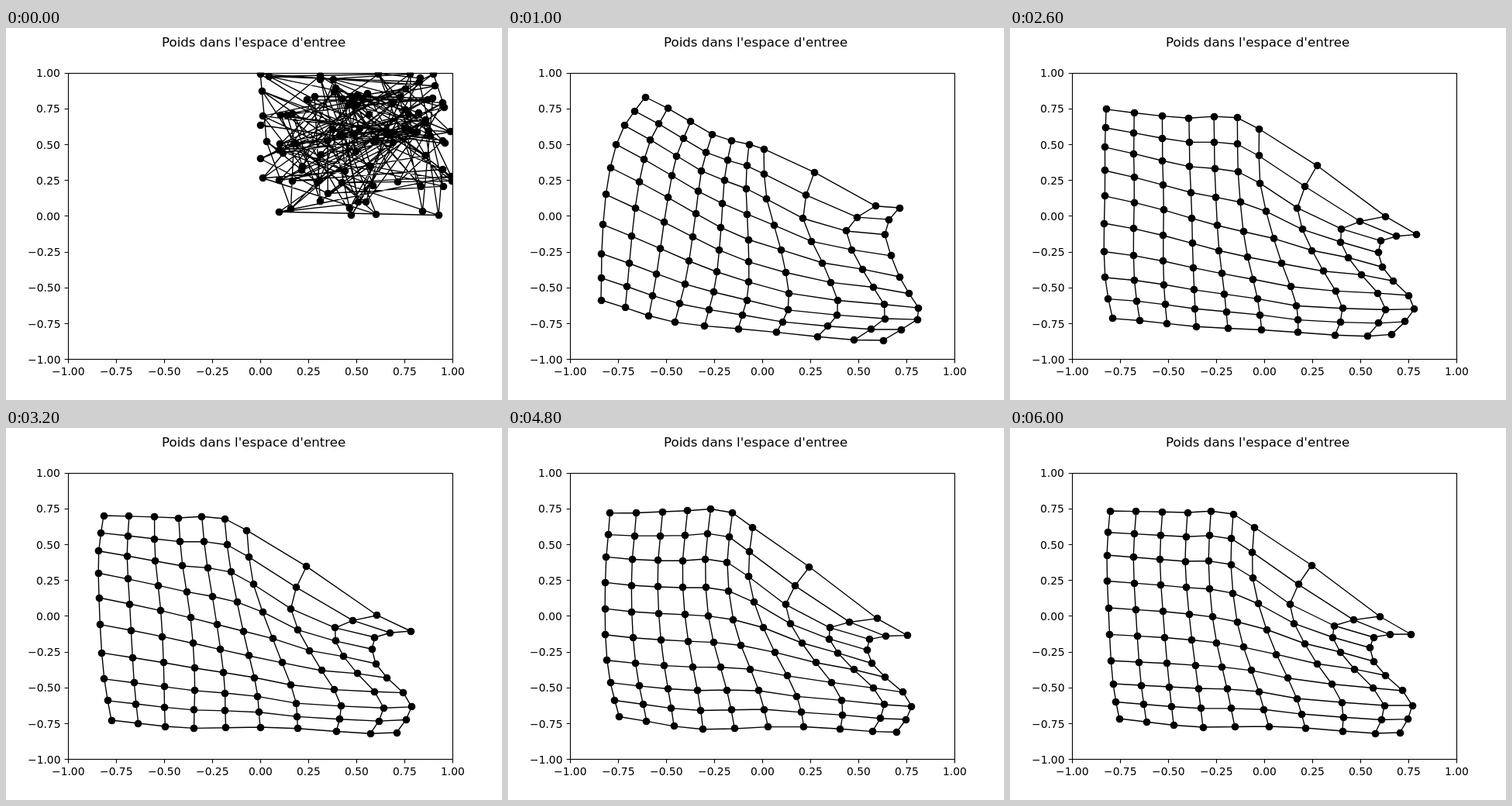
Write an HTML page with a canvas that moves like this. It is 640 px wide and 480 px high and loops after 6.2 s.

```html
<!DOCTYPE html>
<html lang="fr">
<head>
<meta charset="utf-8">
<title>Poids dans l'espace d'entree</title>
<style>
html, body { margin: 0; width: 100%; height: 100%; overflow: hidden; background: #fff; }
canvas { display: block; }
</style>
</head>
<body>
<canvas id="stage" width="640" height="480"></canvas>
<script>
const ctx = document.getElementById('stage').getContext('2d');
const N = 10, STEP = 200, LOOP = 6200;
const LEFT = 80, TOP = 57.6, WIDTH = 496, HEIGHT = 369.6;

// The settled net, as a smooth surface through a few of its nodes.
const rest = {
  cols: [0, 3, 5, 6, 7, 8, 9],
  rows: [0, 2, 4, 7, 9],
  points: [
    129,107, 229,109, 288,111, 315,128, 389,177, 477,243, 517,266,
    125,164, 226,172, 285,176, 313,193, 361,227, 418,255, 469,270,
    127,232, 231,240, 293,250, 331,260, 380,278, 426,289, 469,301,
    133,330, 243,336, 321,340, 370,349, 428,354, 483,358, 519,358,
    141,375, 249,386, 334,385, 381,387, 429,391, 471,394, 503,393]
};

// A bend moves the corners, edge middles and centre of the settled net.
const bend = (...points) => ({ cols: [0, 5, 9], rows: [0, 4, 9], points });
const keys = [
  { step: 5, bend: bend(48,-18, 23,39, -12,-34, 5,-52, 17,23, 36,20, -21,-24, -37,3, -19,10) },
  { step: 9, bend: bend(-6,-10, 14,6, 7,3, -5,-11, 7,9, 22,18, -12,-3, -20,4, -30,11) },
  { step: 16, bend: bend(-3,6, -6,6, 5,-4, -7,-13, 13,12, 8,3, -5,2, -6,1, 1,0) },
  { step: 20 },
  { step: 30 }
];

let seed = 11;
function random() {
  seed = (seed * 16807) % 2147483647;
  return seed / 2147483647;
}

// Cubic curve through the values vs at the knots ks.
function cubic(ks, vs, u) {
  const last = ks.length - 1;
  const chord = i => (vs[i + 1] - vs[i]) / (ks[i + 1] - ks[i]);
  const slope = i => {
    if (i === 0) return chord(0);
    if (i === last) return chord(last - 1);
    const a = ks[i] - ks[i - 1], b = ks[i + 1] - ks[i];
    return (chord(i - 1) * b + chord(i) * a) / (a + b);
  };
  let i = 0;
  while (i < last - 1 && u >= ks[i + 1]) i++;
  const h = ks[i + 1] - ks[i], t = (u - ks[i]) / h, s = 1 - t;
  return s * s * (1 + 2 * t) * vs[i] + t * t * (3 - 2 * t) * vs[i + 1]
    + h * t * s * (s * slope(i) - t * slope(i + 1));
}

function surface({ cols, rows, points }, c, r) {
  return [0, 1].map(axis => cubic(rows, rows.map((_, i) =>
    cubic(cols, cols.map((_, j) => points[(i * cols.length + j) * 2 + axis]), c)), r));
}

const grid = node => Array.from({ length: N * N }, (_, k) => node(k % N, Math.floor(k / N)));

const start = grid(() => [328 + 248 * random(), 58 + 184 * random() ** 1.25]);
for (const key of keys) {
  key.nodes = grid((c, r) => {
    const [x, y] = surface(rest, c, r);
    const [dx, dy] = key.bend ? surface(key.bend, c, r) : [0, 0];
    return [x + dx, y + dy];
  });
}

function nodesAt(step) {
  if (step === 0) return start;
  if (step < keys[0].step) {
    // The net opens quickly from its middle.
    const s = 1 - 0.45 * Math.exp(1 - step);
    return keys[0].nodes.map(([x, y]) => [300 + (x - 300) * s, 262 + (y - 262) * s]);
  }
  let i = 0;
  while (i < keys.length - 2 && step >= keys[i + 1].step) i++;
  const a = keys[i], b = keys[i + 1];
  const t = (step - a.step) / (b.step - a.step);
  const sway = 3 * Math.sin(Math.PI * t);
  return grid((c, r) => {
    const [ax, ay] = a.nodes[r * N + c], [bx, by] = b.nodes[r * N + c];
    return [
      ax + (bx - ax) * t + sway * Math.sin(step * 2.4 + r * 0.7 + c * 0.3),
      ay + (by - ay) * t + sway * Math.sin(step * 1.9 + c * 0.8 - r * 0.3)];
  });
}

function drawNet(nodes) {
  ctx.save();
  ctx.beginPath();
  ctx.rect(LEFT, TOP, WIDTH, HEIGHT);
  ctx.clip();
  ctx.lineWidth = 1.39;
  ctx.beginPath();
  nodes.forEach(([x, y], k) => {
    const link = j => { ctx.moveTo(x, y); ctx.lineTo(...nodes[j]); };
    if (k % N < N - 1) link(k + 1);
    if (k + N < N * N) link(k + N);
  });
  ctx.stroke();
  for (const [x, y] of nodes) {
    ctx.beginPath();
    ctx.arc(Math.floor(x) + 0.5, Math.floor(y) + 0.5, 4.86, 0, 2 * Math.PI);
    ctx.fill();
  }
  ctx.restore();
}

// Text starts on whole pixels; align is 0.5 for centred, 1 for right.
function write(text, x, y, align) {
  ctx.fillText(text, Math.round(x - ctx.measureText(text).width * align), Math.round(y));
}

function drawAxes() {
  const snap = v => Math.floor(v + 0.5) + 0.5;
  ctx.lineWidth = 1.11;
  ctx.strokeRect(80.5, 58.5, 496, 369);
  ctx.font = '13.89px "DejaVu Sans", sans-serif';
  ctx.beginPath();
  for (let i = 0; i <= 8; i++) {
    const value = i / 4 - 1;
    const label = (value < 0 ? '\u2212' : '') + Math.abs(value).toFixed(2);
    const x = LEFT + WIDTH * i / 8, y = TOP + HEIGHT * (1 - i / 8);
    ctx.moveTo(snap(x), 427.5);
    ctx.lineTo(snap(x), 432.4);
    ctx.moveTo(80.5, snap(y));
    ctx.lineTo(75.6, snap(y));
    write(label, x, 448, 0.5);
    write(label, 70.3, y + 5.5, 1);
  }
  ctx.stroke();
  ctx.font = '16.67px "DejaVu Sans", sans-serif';
  write("Poids dans l'espace d'entree", 320, 24, 0.5);
}

const begin = performance.now();
function draw() {
  const time = Math.max(0, performance.now() - begin) % LOOP;
  ctx.fillStyle = '#fff';
  ctx.fillRect(0, 0, 640, 480);
  ctx.fillStyle = ctx.strokeStyle = '#000';
  drawNet(nodesAt(Math.floor(time / STEP)));
  drawAxes();
  requestAnimationFrame(draw);
}
draw();
</script>
</body>
</html>
```
